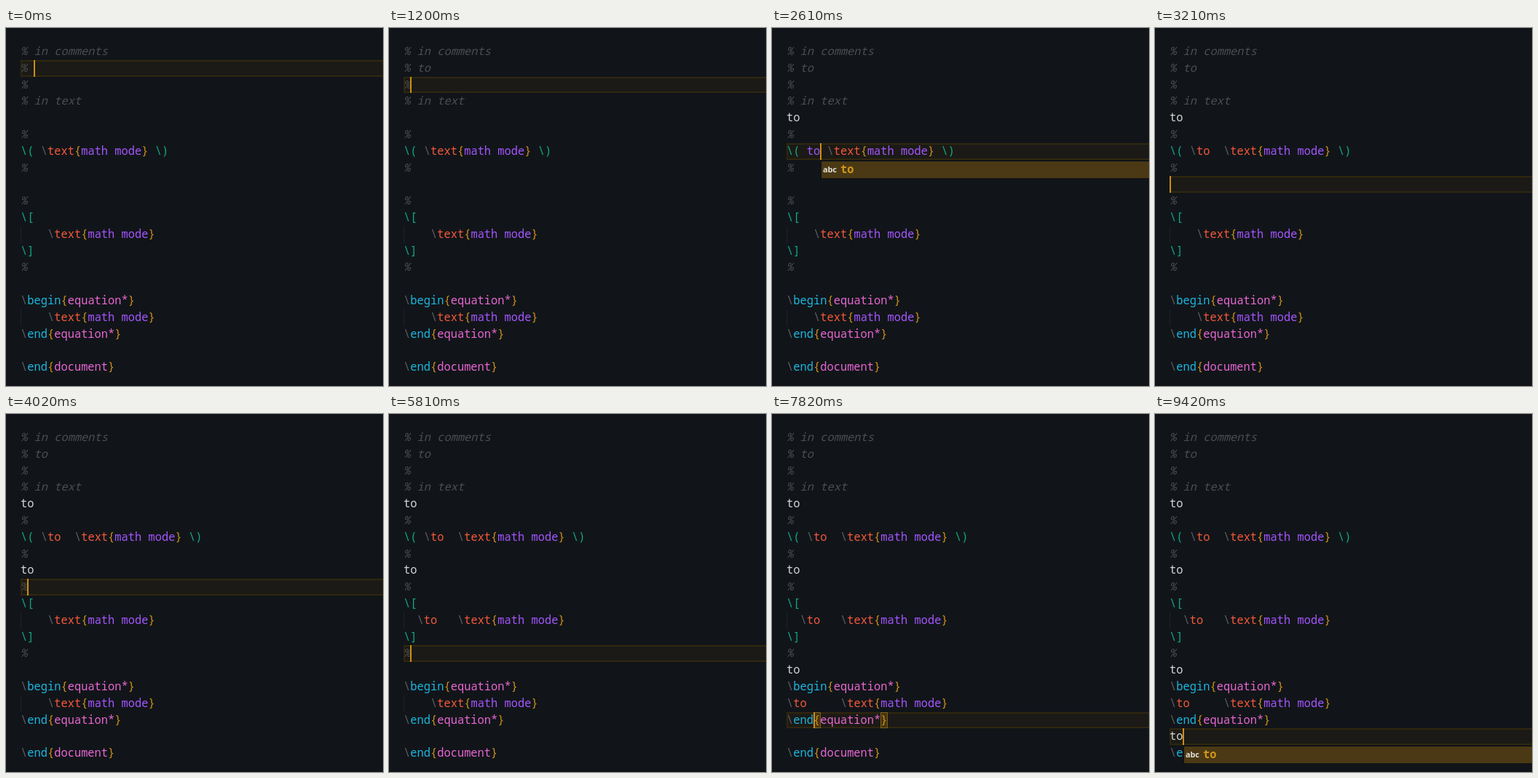
Write an HTML page that moves like this. It is 518 px wide and 491 px high and loops after 9620 ms.

```html
<!DOCTYPE html>
<html lang="en">
<head>
<meta charset="utf-8">
<title>Editor typing</title>
<style>
  html, body { margin: 0; width: 100%; height: 100%; overflow: hidden; background: #111519; }
  svg { display: block; width: 518px; height: 491px; }
  text { font: 500 15.4px "Noto Sans Mono", monospace; white-space: pre; }
  .comment { fill: #4b4e51; font-weight: 400; font-style: italic; }
  .slash { fill: #5b5e61; }
  .command { fill: #f4583a; }
  .block { fill: #1cb6e0; }
  .name { fill: #e866d2; }
  .math { fill: #a555ff; }
  .delim { fill: #12a880; }
  .brace { fill: #d0901c; }
  .plain { fill: #d6d6d4; }
  .match { fill: #d0961c; font-weight: 700; }
  .icon { fill: #e4e0d8; font: 600 11px "Noto Sans", sans-serif; letter-spacing: -.2px; }
</style>
</head>
<body>
<svg id="stage" viewBox="0 0 518 491"></svg>
<script>
const LOOP = 9620, LEFT = 20, CHAR = 9.24, ROW = 22.8, TOP = 21.5, BASE = 16;
const stage = document.getElementById("stage");

const initialLines = String.raw`% in comments
% 
%
% in text

%
\( \text{math mode} \)
%

%
\[
    \text{math mode}
\]
%

\begin{equation*}
    \text{math mode}
\end{equation*}

\end{document}`.split("\n");

// Each step: time, cursor line, cursor column, then optional line text, popup, blink and bracket state.
const word = { text: "to", popup: ["to"] };
const steps = [
  [0, 2, 2],
  [200, 2, 2, { off: true }],
  [600, 2, 3, { text: "% t" }],
  [800, 2, 4, { text: "% to" }],
  [1200, 3, 1],
  [1400, 4, 4],
  [1600, 5, 0],
  [2010, 5, 2, word],
  [2410, 7, 2],
  [2610, 7, 5, { text: "\\( to \\text{math mode} \\)", popup: ["to"] }],
  [2810, 7, 7, { text: "\\( \\to  \\text{math mode} \\)" }],
  [3210, 9, 0],
  [3610, 9, 2, word],
  [4020, 10, 1],
  [4210, 11, 2],
  [4410, 12, 2],
  [5010, 12, 6, { text: "  \\to   \\text{math mode}" }],
  [5410, 12, 6, { off: true }],
  [5810, 14, 1],
  [6010, 15, 0],
  [6410, 15, 2, word],
  [6820, 16, 2],
  [7010, 17, 0],
  [7410, 17, 4, { text: "\\to     \\text{math mode}" }],
  [7820, 18, 4, { brackets: [4, 14] }],
  [8020, 19, 0],
  [8220, 19, 1, { text: "t", popup: ["text", "to"], typed: 1 }],
  [8420, 19, 2, word],
  [8820, 19, 2, { popup: ["to"], off: true }],
  [9420, 19, 2, { popup: ["to"] }]
];

const colX = col => LEFT + col * CHAR;
const lineY = line => Math.floor(TOP + (line - 1) * ROW);
const lineHeight = line => lineY(line + 1) - lineY(line);
const escapeText = s => s.replace(/&/g, "&amp;").replace(/</g, "&lt;");
const label = (x, y, cls, s) => `<text x="${x}" y="${y}" class="${cls}">${escapeText(s)}</text>`;
const rect = (x, y, w, h, fill, extra = "") =>
  `<rect x="${x}" y="${y}" width="${w}" height="${h}" fill="${fill}" ${extra}/>`;

function tokens(line) {
  if (line.startsWith("%")) return [[0, "comment", line]];
  const inMath = line.startsWith("\\(");
  const result = [];
  let before = "";
  for (const m of line.matchAll(/\\[()[\]]|\\|[{}]|[^\\{}\s][^\\{}]*/g)) {
    const s = m[0];
    let cls = inMath ? "math" : "plain";
    if (s.length === 2 && s[0] === "\\") cls = "delim";
    else if (s === "\\") cls = "slash";
    else if (s === "{" || s === "}") cls = "brace";
    else if (before === "\\") cls = /^(begin|end)$/.test(s) ? "block" : "command";
    else if (before === "{") cls = s === "math mode" ? "math" : "name";
    result.push([m.index, cls, s]);
    before = s;
  }
  return result;
}

function drawLine(text, i) {
  const line = i + 1, y = lineY(line);
  const guide = text.startsWith(" ") ? rect(LEFT, y, 1, lineHeight(line), "#1f2327") : "";
  return guide + tokens(text).map(([col, cls, s]) => label(colX(col), y + BASE, cls, s)).join("");
}

function drawHighlight(line) {
  return rect(LEFT + 1, lineY(line) + 1, 520, lineHeight(line) - 2, "#1b1a16",
    'stroke="#30270f" stroke-width="2"');
}

function drawBracket(line, col) {
  return rect(Math.round(colX(col)) + .5, lineY(line) + .5, 9, lineHeight(line) - 1, "#443511",
    'stroke="#80601a"');
}

function drawPopup(line, col, items, typed = 2) {
  const x = Math.round(colX(col)), y = lineY(line + 1) + 1;
  const rows = items.map((item, i) => {
    const top = y + 1 + i * 23, base = top + BASE;
    return (i ? "" : rect(x + 2, top, 520, 23, "#4a3914")) +
      label(x + 4, base - 1, "icon", "abc") +
      label(x + 28, base, "match", item.slice(0, typed)) +
      label(x + 28 + typed * CHAR, base, "plain", item.slice(typed));
  });
  return rect(x + 1, y, 530, items.length * 23 + 2, "#0c0f12") + rows.join("");
}

function render(time) {
  const lines = initialLines.slice();
  let current;
  for (const step of steps) {
    if (step[0] > time) break;
    current = step;
    if (step[3]?.text) lines[step[1] - 1] = step[3].text;
  }
  const [, line, col, state = {}] = current;
  const cursor = state.off ? "" :
    rect(Math.round(colX(col)), lineY(line), 2, lineHeight(line), "#cc8e16");
  stage.innerHTML =
    rect(0, 0, 518, 491, "#111519") +
    drawHighlight(line) +
    (state.brackets || []).map(c => drawBracket(line, c)).join("") +
    lines.map(drawLine).join("") +
    cursor +
    (state.popup ? drawPopup(line, col, state.popup, state.typed) : "");
}

const start = performance.now();
function tick() {
  render((performance.now() - start) % LOOP);
  requestAnimationFrame(tick);
}
tick();
</script>
</body>
</html>
```
